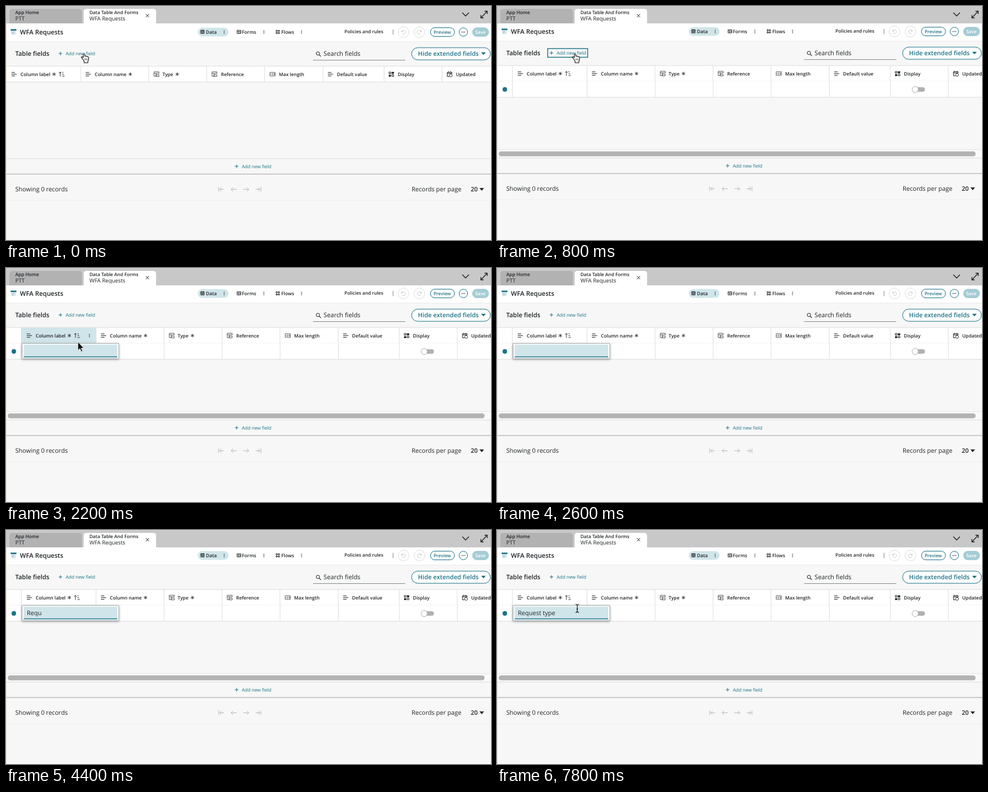
Recreate the animation shown at these times as an HTML page. Size 837x404 px, loop 8 s.

```html
<!DOCTYPE html>
<html lang="en">
<head>
<meta charset="utf-8">
<title>Table fields</title>
<style>
  html, body { margin: 0; width: 100%; height: 100%; overflow: hidden; background: #f7f7f7; }
  svg { display: block; width: 837px; height: 404px; }
  text { font-family: "Open Sans", "Noto Sans", sans-serif; text-rendering: geometricPrecision; white-space: pre; }
</style>
</head>
<body>
<svg id="stage" viewBox="0 0 837 404"></svg>
<script>
const INK = '#1f2326', TEAL = '#1b7286', PALE = '#d0e5e9', RULE = '#dedede', FAINT = '#b4b8ba';

// Text is placed by its left edge and the middle of its capitals.
const text = (x, mid, size, weight, str, fill = INK, id = '') =>
  `<text id="${id}" x="${x}" y="${mid + size * 0.36}" font-size="${size}" font-weight="${weight}" fill="${fill}">${str}</text>`;
const rect = (x, y, w, h, fill, extra = '') =>
  `<rect x="${x}" y="${y}" width="${w}" height="${h}" fill="${fill}" ${extra}/>`;
const line = (d, stroke = INK, width = 1, extra = '') =>
  `<path d="${d}" fill="none" stroke="${stroke}" stroke-width="${width}" ${extra}/>`;
const shape = (d, fill = INK, extra = '') => `<path d="${d}" fill="${fill}" ${extra}/>`;
const circle = (x, y, r, fill, extra = '') => `<circle cx="${x}" cy="${y}" r="${r}" fill="${fill}" ${extra}/>`;
const group = (id, body, extra = '') => `<g id="${id}" ${extra}>${body}</g>`;
const at = (x, y, body) => `<g transform="translate(${x} ${y})">${body}</g>`;

const dots = (x, y) => [-2.3, 0, 2.3].map(d => circle(x, y + d, 0.75, INK)).join('');
const caret = (x, y, fill) => shape(`M${x} ${y}h8l-4 4.6z`, fill);
const plus = (x, y) => line(`M${x - 3} ${y}h6M${x} ${y - 3}v6`, TEAL, 1);
const star = (x, y) => line(`M${x} ${y - 3}v6M${x - 2.8} ${y - 1.6}l5.6 3.2M${x - 2.8} ${y + 1.6}l5.6 -3.2`, INK, 0.9);

// Small icons, each centred on its own origin.
const icons = {
  text: line('M-4.5 -3h6M-4.5 0h9M-4.5 3h6', INK, 1.1),
  table: line('M-4.5 -4h8.5v3M-4.5 -4v7.5h3.5M-4.5 -1.5h8.5M-1 -1.5v5M-1 1h5v3h-5z', '#454a4d', 0.9),
  number: line('M-4.5 -3.2h9v6.4h-9zM-3 -1.2v2.6M-1 -1.2h1.6l-1.6 2.6h1.6M2 -1.2h1.4v2.6h-1.4M2.2 0h1', '#454a4d', 0.8),
  display: line('M-4 -3.7h3v3h-3zM1 0.8h3v3h-3z', INK, 1) + shape('M0.5 -4h4v3.4h-4zM-4.3 1h3.6v3.2h-3.6z'),
  date: line('M4 -1v-2.2h-8v7h3.5M-4 -1.2h8M-2 -4.8v2M2 -4.8v2', INK, 1) + circle(2.2, 2.2, 2.5, '#fff', `stroke="${INK}" stroke-width=".9"`),
  grid: line('M-3 -2.8h6v5.6h-6zM-3 -.2h6M-1 -1v3.8M1 -1v3.8M-3 -2.2h6', INK, 0.9),
  form: line('M-3.2 -2.8h6.4v5.6h-6.4zM-3.2 -.8h6.4M-.8 -.8v3.6M.8 1h2.4', INK, 0.9),
  flow: line('M-3 -2.8h2v2h-2zM1 -2.8h2v2h-2zM-3 1h2v2h-2zM1 1h2v2h-2zM-1 -1.8h2M-1 2h2', INK, 0.9),
};
const icon = (name, x, y) => at(x, y, icons[name]);

const tabBar =
  rect(0, 0, 837, 30, '#c8c8c9') +
  shape('M6 30V10q0 -5 5 -5H126q5 0 5 5V30z', '#b2b2b3') +
  shape('M134 30V10q0 -5 5 -5H254q5 0 5 5V30z', '#fff') +
  text(16, 11, 8.1, 600, 'App Home') + text(16, 22, 9.4, 400, 'PTT') +
  text(144, 11, 8, 600, 'Data Table And Forms') + text(144, 22, 9.4, 400, 'WFA Requests') +
  line('M241.5 14l5.4 5.4M246.9 14l-5.4 5.4', INK, 1) +
  line('M787.5 11.5l5.7 5.7 5.7 -5.7', INK, 1.4) +
  line('M819.5 20.5L830.5 9M825.8 9h4.7v4.7M824.2 20.5h-4.7v-4.7', INK, 1.3);

const views = [['Data', 'grid', 339, 345, 376.5], ['Forms', 'form', 402, 407, 445], ['Flows', 'flow', 469, 475, 510]];
const pill = (x, y, w, h, fill, stroke) => rect(x, y, w, h, fill, `rx="${h / 2}" stroke="${stroke}"`);
const undo = 'M-3.2 -3v2.6h2.6M-3 -.6a3.3 3.3 0 1 1 .8 3.2';

const toolbar =
  rect(0, 29, 837, 32, '#fff') + line('M0 60.5H837', '#ececec') +
  rect(8, 39, 10, 2.6, TEAL) + rect(9, 42, 8, 6.5, '#dbe8ec') + line('M10 44.3h4M10 46.4h3', '#8fb4c0', 0.8) +
  text(24, 44, 11, 600, 'WFA Requests') +
  rect(331, 36.5, 53, 15, PALE, 'rx="7.5"') +
  views.map(([label, glyph, ix, tx, dx]) => icon(glyph, ix, 43.7) + text(tx, 43.6, 8.2, 600, label) + dots(dx, 44)).join('') +
  text(584, 43.5, 8, 600, 'Policies and rules') + line('M668 39.5v9', '#777', 0.9) +
  [[686, 1], [713.5, -1]].map(([x, flip]) => circle(x, 44, 9.3, '#fff', 'stroke="#dedede"') +
    `<g transform="translate(${x} 44) scale(${flip} 1)">${line(undo, '#c8cacb', 1)}</g>`).join('') +
  pill(732.5, 36.5, 41.5, 15, '#fff', TEAL) + text(738, 44, 7.9, 600, 'Preview', TEAL) +
  circle(789.3, 44, 7.3, '#fff', `stroke="${TEAL}"`) + [-2.4, 0, 2.4].map(d => circle(789.3 + d, 44, 0.8, INK)).join('') +
  pill(805, 36.5, 28, 15, '#a5ccd4', '#a5ccd4') + text(809.7, 44, 8, 600, 'Save', '#fff');

const addField = (x, y) => plus(x, y) + text(x + 9, y, 8.05, 500, 'Add new field', TEAL);

const fieldBar =
  text(16, 81, 10.9, 600, 'Table fields') + addField(94, 81) +
  circle(538.3, 81, 2.9, 'none', `stroke="${INK}"`) + line('M540.4 83.2l3 3', INK, 1.2) +
  text(548, 81.3, 10.8, 400, 'Search fields') + line('M530 92.5H689', '#858a8c') +
  pill(700, 71, 136, 21, '#fff', TEAL) + text(711, 81.5, 10.6, 600, 'Hide extended fields', TEAL) + caret(820, 79, TEAL);

// Left border, icon and label of every column before a row exists.
const columns = [
  [0, 'text', 14, 25, 'Column label', 83], [129, 'text', 142, 153, 'Column name', 214.5],
  [246.5, 'table', 260, 270, 'Type', 295.5], [346.5, 'table', 360, 371, 'Reference'],
  [446.5, 'number', 460, 471, 'Max length'], [547, 'text', 560, 571, 'Default value'],
  [652.5, 'display', 665, 676, 'Display'], [752.5, 'date', 765.5, 776.5, 'Updated'],
];
const headings = columns.map(([border, glyph, ix, tx, label, required]) =>
  (border ? line(`M${border} 103v27`, RULE) : '') + icon(glyph, ix, 116.7) +
  text(tx, 116.6, 8.15, 600, label) + (required ? star(required, 116.7) : '')).join('') +
  line('M93.5 120.5v-7.5M91.5 115l2 -2.2 2 2.2M97 113.5h2M97 116.8h3M97 120h4.2', INK, 0.9);
const rowBorders = columns.map(([x]) => line(`M${x + 26.5} 130v27`, RULE)).join('');

const row =
  rect(0, 130, 837, 27, '#fff') + rowBorders + line('M0 157.5H837', RULE) +
  circle(13.5, 144, 3.9, TEAL) +
  rect(718, 140.2, 20.5, 7.8, '#b0b0b1', 'rx="3.9"') + circle(721.8, 144.2, 5.3, '#fff', 'stroke="#a5a5a6" stroke-width=".9"') +
  line('M0 248H837', RULE) + rect(0, 248.5, 837, 13, '#fafafa') + rect(3, 251, 823, 8.5, '#b3b3b4', 'rx="4.2"');

const footer =
  line('M0 262.5H837', RULE) + addField(398, 275.8) + line('M0 289.3H837', '#bdbdbe', 1.6) +
  text(16, 315.6, 10.6, 400, 'Showing 0 records') +
  line('M367 311.5v8M376 315.5h-7M372 312.3l-3.2 3.2 3.2 3.2' +
    'M398 315.5h-9.5M392 312l-3.5 3.5 3.5 3.5' +
    'M409.5 315.5h9.5M415.5 312l3.5 3.5 -3.5 3.5' +
    'M440 311.5v8M431 315.5h7M435 312.3l3.2 3.2 -3.2 3.2', FAINT, 1) +
  text(700, 315.6, 10.6, 400, 'Records per page') + text(802, 315.6, 10.6, 600, '20') + caret(817, 313.3, INK) +
  line('M0 334.5H837', '#f0f0f0');

const editor =
  rect(28, 130.5, 166.5, 26, '#fff', 'stroke="#a9adaf" stroke-width=".8" style="filter:drop-shadow(0 1px 2px #0006)"') +
  rect(30.5, 132.5, 161.5, 21.5, PALE) + line('M30.5 153.4h161.5', TEAL, 1.5) +
  text(36, 142.7, 10.6, 400, '', INK, 'typed');

const hand = shape('M133.2 92.5l-3 -3.3q-.8 -1.8 1.2 -1.5l2 1.3v-5.2q.1 -1.3 1.3 -1.3t1.2 1.3v2.8q1.8 -.7 2.4 .4q1.7 -.5 2.2 .6q2 -.2 2 1.4v3.6l-1.3 3.2v2.2h-6.4v-2z',
  '#fff', 'stroke="#111" stroke-width="1.1" stroke-linejoin="round"') + line('M136 90.5v3M138 90.5v3M140 90.5v3', '#111', 0.7);
const arrow = shape('M0 0V15.2L3.5 12 5.9 17.4 8.3 16.3 5.9 11.2H10.5z', '#111', 'stroke="#fff" stroke-width=".9"');
const beam = line('M135.5 128.3q3 0 3 2v10q0 2 -3 2M141.5 128.3q-3 0 -3 2M138.5 140.3q0 2 3 2M137 136.5h3', '#111', 1.1);

document.getElementById('stage').innerHTML =
  rect(0, 0, 837, 404, '#f7f7f7') +
  group('page',
    toolbar + fieldBar + rect(0, 103, 837, 27, '#fff') +
    group('hover', rect(27, 103, 128, 27, PALE) + dots(144, 116.8)) +
    group('headings', headings) + line('M0 102.8H837M0 130.2H837', RULE) +
    group('row', line('M26.5 103v27M836.5 113v7', RULE) + row) + footer +
    group('focus', rect(87.5, 73.5, 69, 15, 'none', `stroke="${TEAL}" stroke-width="1.4"`)) +
    group('editor', editor)) +
  tabBar + line('M.5 30V404', '#efe3d9') + line('M0 .5H837', '#d8cfc8') +
  group('hand', hand) + group('arrow', arrow) + group('beam', beam);

const el = id => document.getElementById(id);
const show = (id, on) => el(id).setAttribute('display', on ? 'inline' : 'none');

const LOOP = 8000, ADDED = 800, MOVED = 1600, OPENED = 2200, HIDDEN = 2600, BEAM = 7800;
const PHRASE = 'Request type';
const keyTimes = [2800, 3400, 3800, 4400, 4800, 5000, 5800, 6600, 6600, 7000, 7200, 7800];

function draw(now) {
  const t = now % LOOP, added = t >= ADDED;
  el('page').setAttribute('transform', `translate(0 ${added ? 0 : 1})`);
  el('headings').setAttribute('transform', `translate(${added ? 26.3 : 0} 0)`);
  show('row', added);
  show('focus', added && t < MOVED);
  show('hover', t >= OPENED && t < HIDDEN);
  show('editor', t >= OPENED);
  show('hand', t < MOVED);
  show('arrow', t >= MOVED && t < HIDDEN);
  el('arrow').setAttribute('transform', `translate(124 ${t < OPENED ? 136 : 127.3})`);
  show('beam', t >= BEAM);
  el('typed').textContent = PHRASE.slice(0, keyTimes.filter(k => k <= t).length);
}

const start = performance.now();
function tick() {
  draw(performance.now() - start);
  requestAnimationFrame(tick);
}
tick();
</script>
</body>
</html>
```
